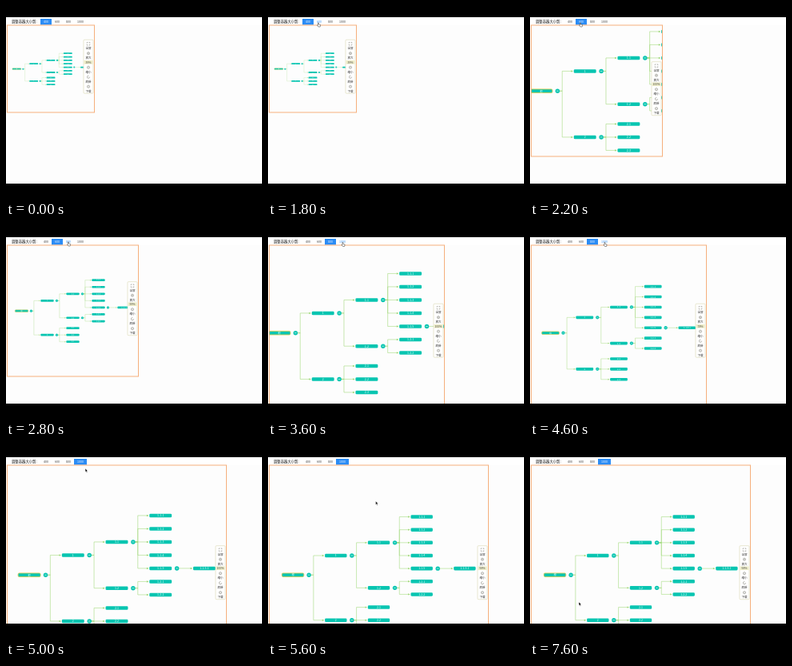
Animation of 320x240 px, one loop 8.4 s. Source, as an HTML page with a canvas:

```html
<!DOCTYPE html>
<html lang="zh">
<head>
<meta charset="utf-8">
<style>
html, body { margin: 0; width: 100%; height: 100%; overflow: hidden; background: #000; }
canvas { display: block; width: 320px; height: 240px; }
</style>
</head>
<body>
<canvas id="stage"></canvas>
<script>
const LOOP = 8400, STEP = 200;
const canvas = document.getElementById('stage');
const ratio = window.devicePixelRatio || 1;
canvas.width = 320 * ratio;
canvas.height = 240 * ratio;
const c = canvas.getContext('2d');
c.scale(ratio, ratio);

const FONT = '"Noto Sans CJK SC", "Noto Sans CJK", sans-serif';
const TEAL = '#08c5b1', GREEN = '#9cd772', BLUE = '#2b8cf5';
const FULL = { dx: 54.7, dy: 16.5 };

// Container sizes with the fitted column and row pitch, and the click time
const sizes = [
  { label: '400', size: 110, dx: 21.3, dy: 4.33, start: 0 },
  { label: '600', size: 165, dx: 32, dy: 8.56, start: 2000, hold: 2400, end: 2800 },
  { label: '800', size: 220, dx: 42.7, dy: 12.9, start: 3400, hold: 3800, end: 4400 },
  { label: '1000', size: 275, dx: 53.7, dy: 16.15, start: 4800, hold: 5200, end: 5600 }
];

// Each node: column, row, label, children
const node = (col, row, label, kids = []) => ({ col, row, label, kids });
const leaves = (col, from, count, label) =>
  Array.from({ length: count }, (_, i) => node(col, from + i, `${label}-${i + 1}`));
const first = leaves(3, 0, 5, '1-1');
first[4].kids = [node(4, 4, '1-1-5-1')];
const tree = node(0, 4.5, '根', [
  node(1, 3, '1', [
    node(2, 2, '1-1', first),
    node(2, 5.5, '1-2', leaves(3, 5, 2, '1-2'))
  ]),
  node(1, 8, '2', leaves(2, 7, 3, '2'))
]);

// Pointer path: time, x, y
const path = [
  [200, 309, 206], [1200, 63, 22], [1400, 62, 21], [2400, 62, 21],
  [2600, 70, 20], [2800, 77, 20], [3400, 77, 20], [3600, 92.5, 20.5],
  [4800, 92.5, 20.5], [5600, 134.5, 69], [5800, 134.5, 69.5], [6000, 134.5, 69],
  [7000, 134.5, 69], [7200, 116, 101], [7400, 80, 165], [7600, 61, 195]
];

const mix = (a, b, k) => a + (b - a) * k;
const ease = k => k * k * (3 - 2 * k);
const clamp = k => Math.max(0, Math.min(1, k));

function pointer(t) {
  if (t < path[0][0]) return null;
  const i = path.findIndex(p => p[0] > t);
  if (i < 0) return path[path.length - 1].slice(1);
  const [a, b] = [path[i - 1], path[i]];
  const k = ease((t - a[0]) / (b[0] - a[0]));
  return [mix(a[1], b[1], k), mix(a[2], b[2], k)];
}

function rect(x, y, w, h, fill) {
  c.fillStyle = fill;
  c.fillRect(x, y, w, h);
}

function text(s, x, y, size, color, align = 'center', weight = 400) {
  c.font = `${weight} ${size}px ${FONT}`;
  c.textAlign = align;
  c.textBaseline = 'middle';
  c.fillStyle = color;
  c.fillText(s, x, y);
}

function line(points, color, width) {
  c.beginPath();
  points.forEach(p => c.lineTo(...p));
  c.strokeStyle = color;
  c.lineWidth = width;
  c.stroke();
}

function shape(points, fill, stroke) {
  c.beginPath();
  points.forEach(p => c.lineTo(...p));
  c.closePath();
  c.fillStyle = fill;
  c.fill();
  c.strokeStyle = stroke;
  c.lineWidth = 0.5;
  c.stroke();
}

function pill(x, y, w, h, r, fill) {
  c.beginPath();
  c.roundRect(x, y, w, h, r);
  c.fillStyle = fill;
  c.fill();
}

function view(t, box) {
  const k = box.start ? ease(clamp((t - box.hold) / (box.end - box.hold))) : 1;
  const mid = 1 + box.size / 2;
  const x = mix(Math.max(14, mid - 2 * FULL.dx), mid - 2 * box.dx, k);
  return {
    x, y: 23.7 + box.size / 2,
    dx: mix(FULL.dx, box.dx, k), dy: mix(FULL.dy, box.dy, k)
  };
}

function drawTree(n, v) {
  const at = m => [v.x + m.col * v.dx, v.y + (m.row - 4.5) * v.dy];
  const [x, y] = at(n);
  const w = v.dx * 0.51, h = v.dx * 0.085;
  if (n.kids.length) {
    const hub = x + v.dx * 0.373, bend = x + v.dx * 0.48;
    const tip = v.dx * 0.022;
    for (const kid of n.kids) {
      const [kx, ky] = at(kid), end = kx - w / 2 - tip;
      line([[hub, y], [bend, y], [bend, ky], [end, ky]], GREEN, v.dx * 0.01);
      c.fillStyle = GREEN;
      c.beginPath();
      c.moveTo(end, ky);
      c.lineTo(end - tip * 1.8, ky - tip);
      c.lineTo(end - tip * 1.8, ky + tip);
      c.fill();
      drawTree(kid, v);
    }
    const r = v.dx * 0.05;
    c.beginPath();
    c.arc(hub, y, r, 0, Math.PI * 2);
    c.fillStyle = TEAL;
    c.fill();
    line([[hub - r / 2, y], [hub + r / 2, y]], '#d8f6f2', r * 0.25);
  }
  pill(x - w / 2, y - h / 2, w, h, h * 0.3, TEAL);
  if (n === tree) {
    c.strokeStyle = '#dccb52';
    c.lineWidth = v.dx * 0.016;
    c.stroke();
  }
  text(n.label, x, y, v.dx * 0.064, '#effffb');
}

function icon(kind, x, y) {
  const ink = '#77776c';
  if (kind === 0) {
    for (const sx of [-1, 1]) for (const sy of [-1, 1]) {
      const [ex, ey] = [x + 1.8 * sx, y + 1.8 * sy];
      line([[ex - 1.2 * sx, ey], [ex, ey], [ex, ey - 1.2 * sy]], ink, 0.5);
    }
    return;
  }
  c.strokeStyle = ink;
  c.lineWidth = 0.5;
  c.beginPath();
  c.arc(x, y, 1.6, 0, kind === 3 ? 5 : Math.PI * 2);
  c.stroke();
  if (kind < 3) line([[x - 0.8, y], [x + 0.8, y]], ink, 0.4);
  if (kind === 1 || kind === 4) line([[x, y - 0.8], [x, y + 0.8]], ink, 0.4);
}

function drawTools(box, zoom) {
  const x = box.size - 13, y = 20.7 + box.size / 2 - 33.5, mid = x + 6;
  pill(x, y, 12, 67, 1, '#fff');
  c.strokeStyle = '#dad7b2';
  c.lineWidth = 0.6;
  c.stroke();
  ['全屏', '放大', '缩小', '刷新', '下载'].forEach((label, i) => {
    const top = y + 5 + i * 12 + (i > 1 ? 5.5 : 0);
    icon(i, mid, top);
    text(label, mid, top + 5.6, 3.6, '#333');
  });
  rect(x + 0.5, y + 25.8, 11, 4.6, '#eeedc8');
  text(zoom + '%', mid, y + 28.2, 3.4, '#444');
}

function drawHeader(box, p) {
  rect(0, 14, 320, 10, '#fff');
  text('调整容器大小到:', 7, 19.3, 4.35, '#111', 'left', 500);
  sizes.forEach((s, i) => {
    const x = 43 + i * 14, w = i === 3 ? 16 : 14;
    const on = s === box;
    const hover = p && p[1] < 24 && p[0] >= x && p[0] < x + w;
    if (on) rect(x, 16, w, 7.5, BLUE);
    text(s.label, x + w / 2, 19.8, 3.5, on ? '#fff' : hover ? BLUE : '#333');
  });
}

function drawPointer([x, y]) {
  c.save();
  c.translate(x, y);
  if (y < 24) {
    shape([[0.5, 0], [1.3, 0], [1.4, 2], [3.5, 2.5], [3.2, 5], [1, 5], [-0.5, 3], [0.4, 3]], '#fff', '#333');
  } else {
    shape([[0, 0], [0, 4.4], [1, 3.5], [1.8, 5.2], [2.6, 4.8], [1.9, 3.2], [3.2, 3.1]], '#000', '#fff');
  }
  c.restore();
}

function draw(now) {
  const t = Math.floor((now % LOOP) / STEP) * STEP;
  const box = sizes.filter(s => s.start <= t).pop();
  const v = view(t, box), p = pointer(t);
  rect(0, 0, 320, 240, '#000');
  c.save();
  c.beginPath();
  c.rect(0, 14, 320, 208);
  c.clip();
  rect(0, 14, 320, 208, '#fdfdfd');
  drawHeader(box, p);

  c.save();
  c.beginPath();
  c.rect(1, 24, box.size, box.size);
  c.clip();
  drawTree(tree, v);
  drawTools(box, Math.round(100 * v.dx / FULL.dx));
  c.restore();

  c.strokeStyle = '#f6b07c';
  c.lineWidth = 1;
  c.strokeRect(1.5, 24, box.size - 1, box.size - 1);
  if (p) drawPointer(p);
  c.restore();
}

const begin = performance.now();
function tick() {
  draw(performance.now() - begin);
  requestAnimationFrame(tick);
}
tick();
</script>
</body>
</html>
```
